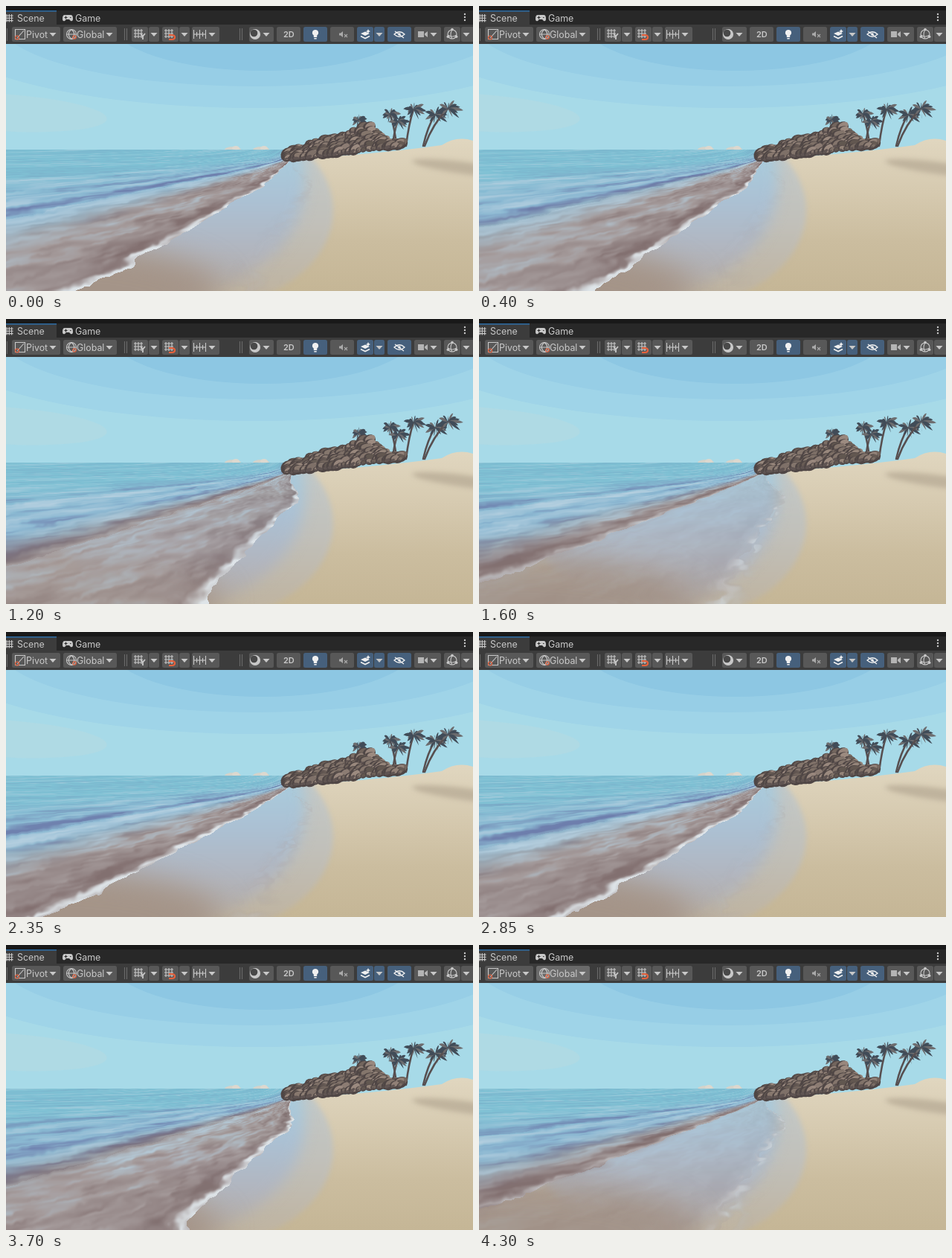
An HTML page with a canvas that plays this animation: 628x383 px, repeating every 4350 ms.

```html
<!DOCTYPE html>
<html lang="en">
<head>
<meta charset="utf-8">
<title>Beach scene</title>
<style>
html, body { margin: 0; width: 100%; height: 100%; overflow: hidden; background: #3c3c3c; }
canvas, svg { position: absolute; left: 0; top: 0; }
svg text { font: 12.4px Inter, sans-serif; fill: #c8c8c8; }
</style>
</head>
<body>
<canvas id="stage" width="628" height="383"></canvas>
<svg id="ui" width="628" height="51" fill="none" stroke="#c8c8c8" stroke-width="1.1"></svg>
<script>
const W = 628, H = 383, LOOP = 4350, PERIOD = 2700, HORIZON = 193;
const SEA_W = 412, SEA_H = H - HORIZON;
const { PI, sin, cos, floor, exp, log, sqrt, max, min } = Math;
const ctx = document.getElementById('stage').getContext('2d');

// ---------- helpers ----------
let seed = 7;
const rand = () => (seed = (seed * 16807) % 2147483647) / 2147483647;
const mix = (a, b, k) => a + (b - a) * k;
const smooth = (a, b, v) => {
  const k = max(0, min(1, (v - a) / (b - a)));
  return k * k * (3 - 2 * k);
};
const bell = (v, centre, width) => exp(-(((v - centre) / width) ** 2));

const grid = Float32Array.from({ length: 65536 }, rand);
function noise(x, y) {
  const xi = floor(x), yi = floor(y);
  let fx = x - xi, fy = y - yi;
  fx *= fx * (3 - 2 * fx);
  fy *= fy * (3 - 2 * fy);
  const x0 = xi & 255, x1 = (xi + 1) & 255, y0 = (yi & 255) << 8, y1 = ((yi + 1) & 255) << 8;
  return mix(mix(grid[y0 + x0], grid[y0 + x1], fx), mix(grid[y1 + x0], grid[y1 + x1], fx), fy);
}
function layer(w, h) {
  const c = document.createElement('canvas');
  c.width = w;
  c.height = h;
  return c.getContext('2d');
}
function oval(c, x, y, rx, ry, fill, turn = 0) {
  c.beginPath();
  c.ellipse(x, y, rx, ry, turn, 0, 2 * PI);
  c.fillStyle = fill;
  c.fill();
}
function ramp(c, y0, y1, ...colours) {
  const g = c.createLinearGradient(0, y0, 0, y1);
  colours.forEach((colour, i) => g.addColorStop(i / (colours.length - 1), colour));
  return g;
}

// ---------- sky and sand ----------
const back = layer(W, H);
back.fillStyle = '#a7dae8';
back.fillRect(0, 0, W, H);
oval(back, -10, 143, 146, 25, '#afdae4', 0.06);
oval(back, 335, 20, 440, 117, '#9fd4e8');
oval(back, 335, 20, 345, 88, '#97cee6');
oval(back, 345, 20, 205, 67, '#8dc7e3');
for (const x of [305, 343]) {
  oval(back, x, 193, 11, 4, '#d3d3cb');
  oval(back, x + 4, 191, 5, 3, '#dcd8cf');
}

back.save();
back.beginPath();
back.moveTo(0, HORIZON);
back.lineTo(372, HORIZON);
back.lineTo(372, 207);
back.quadraticCurveTo(500, 199, 586, 187);
back.quadraticCurveTo(606, 174, 628, 181);
back.lineTo(628, H);
back.lineTo(0, H);
back.fillStyle = ramp(back, 180, 383, '#e0d6bf', '#d6cab0', '#cbbd9f', '#c5b696');
back.fill();
back.clip();
back.filter = 'blur(3px)';
oval(back, 618, 218, 72, 8, '#bfb39d', 0.13);
oval(back, 260, 275, 180, 130, ramp(back, 200, 383, '#c3c9c8', '#c1c0ba', '#bfb4a1'));
back.filter = 'blur(9px)';
oval(back, 230, 235, 172, 150, ramp(back, 205, 383, '#a9cbdc', '#abc0d3', '#b1b6c0', '#b4aba4'));
back.filter = 'blur(20px)';
oval(back, 60, 383, 230, 62, '#a49488');
back.restore();

// ---------- rocks ----------
const rocks = layer(W, H);
rocks.filter = 'blur(0.5px)';
const rockBase = x => 207 - 18 * smooth(365, 560, x);
const rockHeight = x => 5 + 18 * bell(x, 428, 44) + 25 * bell(x, 484, 26);
for (let level = 1; level >= 0; level -= 0.14) {
  for (let x = 378; x < 533; x += 4 + rand() * 5) {
    const r = 3 + rand() * 4.5, y = rockBase(x) - r * 0.5 - max(0, rockHeight(x) - 4) * level, turn = rand() - 0.8;
    const lit = 95 + rand() * 65;
    oval(rocks, x, y, r * 1.25, r, '#4f4645', turn);
    oval(rocks, x + r * 0.2, y - r * 0.25, r, r * 0.65, `rgb(${lit}, ${lit * 0.89}, ${lit * 0.82})`, turn);
    oval(rocks, x - r * 0.4, y + r * 0.3, r * 0.6, r * 0.3, '#5f5452', turn);
  }
}

// ---------- palms: crown, then foot ----------
const palms = [[474, 153, 481, 166], [516, 145, 524, 178], [527, 155, 521, 179],
  [548, 139, 538, 188], [577, 146, 561, 188], [594, 138, 563, 188]];
function drawPalms(time) {
  ctx.lineCap = 'round';
  palms.forEach(([x, y, footX, footY], n) => {
    const sway = sin(time * 2 * PI + n * 1.7), size = 12 + n * 1.3;
    ctx.strokeStyle = '#574f50';
    ctx.lineWidth = 2.5;
    ctx.beginPath();
    ctx.moveTo(footX, footY);
    ctx.quadraticCurveTo(mix(footX, x, 0.35), mix(footY, y, 0.6), x, y);
    ctx.stroke();
    for (let k = 0; k < 15; k++) {
      const a = (k / 15) * 2 * PI + n + sway * 0.05, reach = size * (0.65 + 0.4 * sin(k * 5 + n) ** 2);
      const ex = x + cos(a) * reach + size * 0.15, ey = y + sin(a) * reach * 0.72 + 2;
      const mx = mix(x, ex, 0.55), my = mix(y, ey, 0.55);
      ctx.fillStyle = k % 3 ? '#414c58' : '#6d6c6e';
      ctx.beginPath();
      ctx.moveTo(x, y);
      ctx.quadraticCurveTo(mx, my - 6, ex, ey);
      ctx.quadraticCurveTo(mx + 1, my + 3, x, y);
      ctx.fill();
    }
  });
}

// ---------- sea ----------
// Fronts are rays from the far end of the shore; travel grows towards the beach and is 0 at slope BREAK.
const BREAK = 1.65, APEX_X = 388, APEX_Y = 207;
const travel = new Float32Array(SEA_W * SEA_H).fill(9), along = new Float32Array(SEA_H);
for (let y = 0; y < SEA_H; y++) {
  const d = y + HORIZON - APEX_Y, depth = (d + sqrt(d * d + 60)) / 2;
  along[y] = log(depth + 4);
  for (let x = 0; x < SEA_W; x++) {
    if (x > 372 && d < 1) continue;
    const ray = (APEX_X - x) / depth;
    const slope = ray + (34 / depth) * smooth(0, 40, d) * max(0, 1 - ray / 2.2);
    const q = slope < BREAK ? 0.54 * (BREAK - slope) : -0.92 * log(slope / BREAK);
    const wobble = noise(along[y] * 9, q * 3 + 50) - 0.5 + (noise(x / 7, y / 7) - 0.5) * 0.4;
    travel[y * SEA_W + x] = q + wobble * 0.07;
  }
}

const FAR = [127, 193, 212], MID = [140, 184, 210], SHALLOW = [164, 154, 154];
const LIGHT = [182, 208, 224], DEEP = [104, 116, 166], SILT = [124, 104, 104], FOAM = [222, 228, 232];
const sea = layer(SEA_W, SEA_H), pixels = sea.createImageData(SEA_W, SEA_H);
function paintSea(time) {
  const p = time % 1, data = pixels.data;
  const retreat = smooth(0.35, 0.68, p);
  const stain = max(0, 1 - ((p + 0.45) % 1) / 0.7) * 0.7;
  for (let i = 0, o = 0; i < travel.length; i++, o += 4) {
    const q = travel[i];
    if (q > 0.92) {
      data[o + 3] = 0;
      continue;
    }
    const row = along[floor(i / SEA_W)], drift = q - time, behind = p - q;
    const broad = noise(row * 5 + 40, drift * 8 + 90), fine = noise(row * 16 + 90, drift * 25 + 160);
    const lead = behind < 1, u = behind - floor(behind);
    const shallow = smooth(-1.05, -0.5, q), mid = smooth(-2.4, -1, q);

    // Cover of water, then foam at its edge and the line it leaves on the sand.
    let alpha = 0, foam = 0;
    if (behind >= 0) {
      alpha = lead ? 1 - retreat * smooth(-0.65, -0.3, q) : 1;
      foam = smooth(-0.55, -0.2, q) * (1 - smooth(0.02, 0.04 + 0.07 * broad, u)) * (0.35 + 0.85 * fine);
      if (lead) foam *= 1 - smooth(0.42, 0.65, p);
    }
    if (q > 0.35) foam = max(foam, bell(q, 0.6, 0.06) * stain * smooth(0.3, 0.8, fine));

    const chop = (broad - 0.5) * 0.9 + (fine - 0.5) * 0.6;
    const ridge = 0.35 * bell(u, 0.88, 0.1) - 0.6 * bell(u, 0.11, 0.09) - 0.28 * (1 - shallow) * cos(6 * PI * (u - 0.1));
    const shade = max(-1, min(1, chop + ridge * mix(0.15, 1, mid)));
    alpha = max(alpha, foam);
    for (let c = 0; c < 3; c++) {
      const base = mix(mix(FAR[c], MID[c], mid), SHALLOW[c], shallow);
      const tone = shade > 0 ? mix(base, LIGHT[c], shade)
        : mix(base, mix(DEEP[c], SILT[c], shallow), -shade * mix(0.3, 0.85, mid));
      data[o + c] = mix(tone, FOAM[c], min(1, foam));
    }
    data[o + 3] = min(1, alpha) * 255;
  }
  sea.putImageData(pixels, 0, 0);
}

// ---------- toolbar ----------
const box = (x, w, fill = '#585858', id = '') =>
  `<rect ${id && `id="${id}"`} x="${x}" y="28" width="${w}" height="20" rx="2.5" fill="${fill}" stroke="none"/>`;
const line = (d, extra = '') => `<path d="${d}" ${extra}/>`;
const solid = (d, fill = '#c8c8c8') => line(d, `fill="${fill}" stroke="none"`);
const ring = (x, y, r, extra = '') => `<circle cx="${x}" cy="${y}" r="${r}" ${extra}/>`;
const caret = x => solid(`M${x - 4.5} 36h9l-4.5 5z`);
const label = (x, y, text, extra = '') => `<text x="${x}" y="${y}" stroke="none" ${extra}>${text}</text>`;
const hash = (x, y, n, gap) => {
  let d = '';
  for (let i = 0; i < n; i++) d += `M${x + 2 + i * gap} ${y}v${(n - 1) * gap + 4}M${x} ${y + 2 + i * gap}h${(n - 1) * gap + 4}`;
  return line(d);
};
const blue = '#46607c', orange = '#e8613c', white = '#f0f0f0';
document.getElementById('ui').innerHTML = [
  '<g stroke="none"><path d="M0 0h628v6H0z" fill="#191919"/><path d="M0 6h628v19H0z" fill="#282828"/>',
  '<path d="M0 25h628v26H0zM0 6h68v19H0z" fill="#3c3c3c"/><path d="M0 6h68v1.6H0z" fill="#2c6ca5"/></g>',
  hash(-1, 11, 3, 3.3), label(15, 21, 'Scene'),
  solid('M79 12h8q3 0 3 5 0 4-3 3l-2-2h-4l-2 2q-3 1-3-3 0-5 3-5z'),
  line('M78.5 15.5h4M80.5 13.5v4M86 15.5h1.5', 'stroke="#282828"'), label(93, 21, 'Game'),
  [11, 15, 19].map(y => ring(617, y, 1.2, 'fill="#c8c8c8" stroke="none"')).join(''),
  line('M1.5 30v17', 'id="edge" stroke="#686868"'),
  [159.5, 162.5, 314.5, 317.5].map(x => line(`M${x} 30v16`, 'stroke="#6a6a6a"')).join(''),
  box(8, 65), box(77, 72, '#585858', 'global'),
  box(169, 22), box(192, 14), box(210, 22), box(233, 14), box(250, 37), box(327, 33), box(364, 32),
  box(400, 32, blue), box(436, 32), box(472, 22, blue), box(495, 14, blue), box(513, 32, blue),
  box(549, 36), box(589, 22), box(612, 18),
  [63, 139, 199, 240, 277, 350, 502, 575, 619].map(caret).join(''),
  line('M12.5 31.5h13v13h-13zM15 43l9-10'), ring(15, 42.5, 2.5, `stroke="${orange}"`), label(27, 42.5, 'Pivot'),
  ring(88, 38, 6.5), line('M81.5 38h13M88 31.5c-5 4-5 9 0 13c5-4 5-9 0-13'),
  ring(92, 42, 2.2, `stroke="${orange}"`), label(95, 42.5, 'Global'),
  hash(172, 31, 3, 4), line('M181 37l3 3.5 3-3.5M184 40v5', 'stroke-width="1.8"'),
  hash(213, 31, 3, 4), line('M219 39h4q4 0 4 3t-4 3h-4', `stroke="${orange}" stroke-width="2.2"`),
  [252, 256, 260, 264, 268].map((x, i) => line(`M${x}.5 ${i % 2 ? 35 : 32}V${i % 2 ? 41 : 44}`)).join(''), line('M252 38h17'),
  ring(335, 38, 6.5, 'fill="#c8c8c8"'), ring(333.5, 36.5, 4.8, 'fill="#484848" stroke="none"'),
  label(373, 42, '2D', 'style="font-size:11px;font-weight:600"'),
  solid('M416 32a4 4 0 0 1 2.2 7.4V42h-4.4v-2.6A4 4 0 0 1 416 32zM414.3 43h3.4v1.6h-3.4z', white),
  solid('M448 36.5h2l3-2.5v8l-3-2.5h-2z', '#aaa'), line('M455 38l4 4M459 38l-4 4', 'stroke="#aaa"'),
  solid('M477 37l6-2.5 6 2.5-6 3zM487 31l1 2 2 1-2 1-1 2-1-2-2-1 2-1z', white),
  line('M477 40.5l6 3 6-3', `stroke="${white}" stroke-width="1.6"`),
  line('M522 38q7-6.5 14 0q-7 6.5-14 0zM523 34l12 9', `stroke="${white}" stroke-width="1.3"`),
  ring(529, 38, 1.8, `fill="${white}" stroke="none"`),
  solid('M554 34h8v8h-8zM563 37l4-3v8l-4-3z', '#b4b4b4'),
  ring(600, 38, 6), line('M594 39q6 4 12 0M600 32q-4 6 0 12'),
  [-90, 150, 30].map(a => ring(600 + 6.5 * cos(a * PI / 180), 38 + 6.5 * sin(a * PI / 180), 1.8, 'fill="#c8c8c8" stroke="none"')).join(''),
].join('');
const globalButton = document.getElementById('global'), edge = document.getElementById('edge');

// ---------- playback ----------
const start = performance.now();
let shown = -1;
function tick() {
  const step = floor(((performance.now() - start) % LOOP) / 50);
  if (step !== shown) {
    shown = step;
    const time = (step * 50) / PERIOD, hover = step >= 84;
    paintSea(time);
    ctx.drawImage(back.canvas, 0, 0);
    ctx.drawImage(sea.canvas, 0, HORIZON);
    drawPalms(time);
    ctx.drawImage(rocks.canvas, 0, 0);
    globalButton.setAttribute('fill', hover ? '#6a6a6a' : '#585858');
    edge.setAttribute('stroke', hover ? '#b0b0b0' : '#686868');
  }
  requestAnimationFrame(tick);
}
tick();
</script>
</body>
</html>
```
